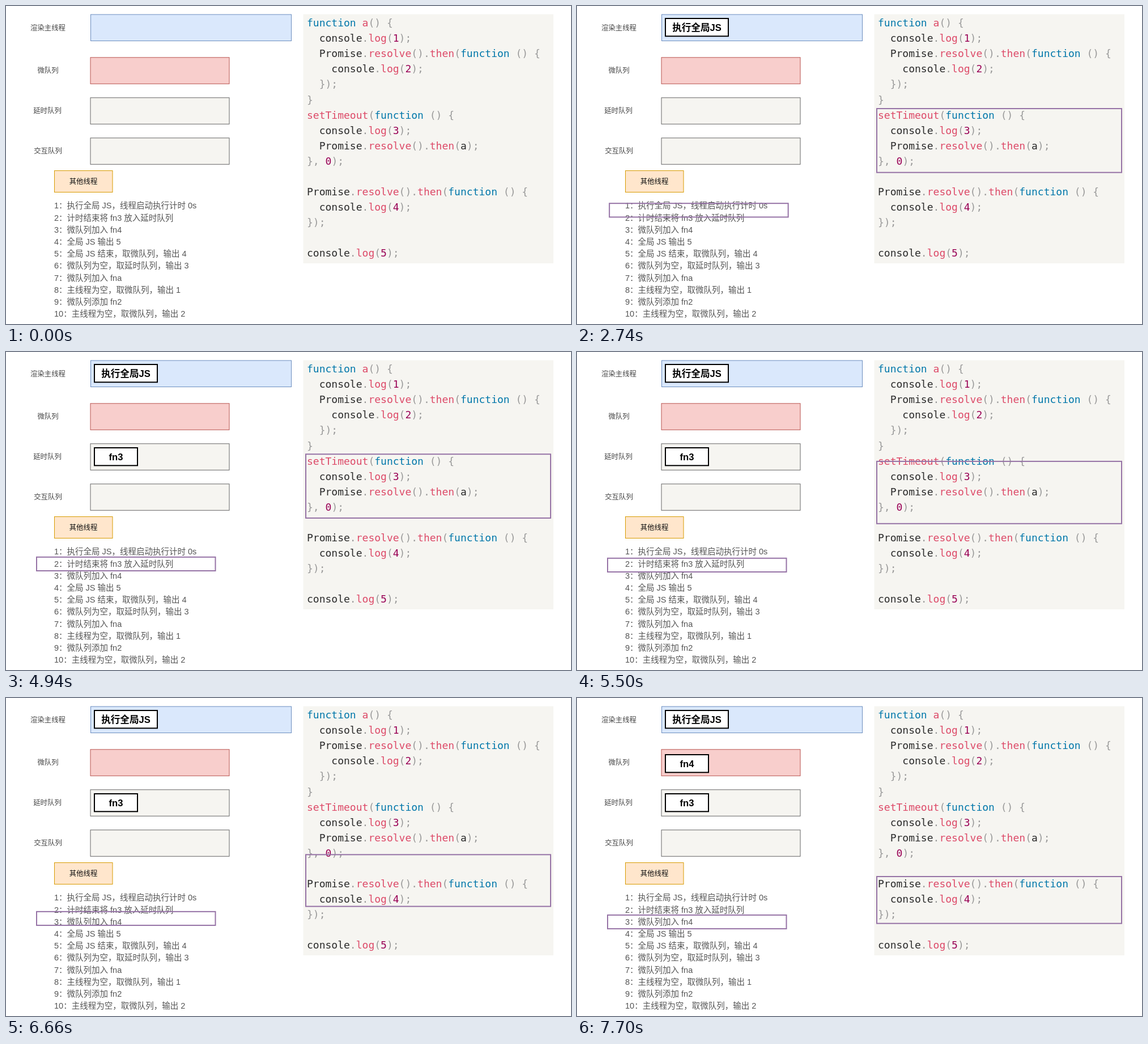
Recreate the animation shown at these times as an HTML page. Size 997 by 561 pixels, loop 8000 ms.

```html
<!DOCTYPE html>
<html lang="zh-CN">
<head>
<meta charset="utf-8">
<title>事件循环</title>
<style>
html, body { margin: 0; width: 100%; height: 100%; overflow: hidden; background: #fff; }
svg { display: block; width: 100%; height: 100%; font-family: "Liberation Sans", "Noto Sans CJK SC", "Noto Sans CJK", sans-serif; }
text { white-space: pre; }
.label { font-size: 12.4px; text-anchor: middle; fill: #444; }
.dark { fill: #111; }
.step { font-size: 14.5px; fill: #555; }
.task { font-size: 16.6px; font-weight: bold; text-anchor: middle; fill: #000; }
.code { font: 18px "DejaVu Sans Mono", monospace; fill: #2b2b2b; }
.keyword { fill: #0077aa; }
.call { fill: #dd4a68; }
.number { fill: #990055; }
.mark { fill: #999; }
</style>
</head>
<body>
<svg id="stage" viewBox="0 0 997 561"></svg>
<script>
const stage = document.getElementById('stage');

function add(parent, tag, attrs, content = '') {
  const node = document.createElementNS('http://www.w3.org/2000/svg', tag);
  for (const key in attrs) node.setAttribute(key, attrs[key]);
  node.textContent = content;
  return parent.appendChild(node);
}
const rect = (parent, x, y, width, height, fill, stroke = 'none', weight = 1) =>
  add(parent, 'rect', { x, y, width, height, fill, stroke, 'stroke-width': weight });
const text = (parent, x, y, className, content) =>
  add(parent, 'text', { x, y, class: className }, content);

function task(y, width, label) {
  const group = add(stage, 'g', {});
  rect(group, 156, y, width, 31.3, '#fff', '#000', 2);
  text(group, 156 + width / 2, y + 22, 'task', label);
  return group;
}
function thread(x, label) {
  const group = add(stage, 'g', {});
  rect(group, x, 290.5, 102.5, 38, '#ffe6cc', '#d79b00');
  text(group, x + 51, 314, 'label dark', label);
  return group;
}

const paper = '#f6f5f1';

// Queues
rect(stage, 149.5, 15, 354, 46.5, '#dae8fc', '#6c8ebf');
rect(stage, 149, 90.8, 245, 46.5, '#f8cecc', '#b85450');
rect(stage, 149, 161.8, 245, 46.5, paper, '#666');
rect(stage, 149, 232.8, 245, 46.5, paper, '#666');
['渲染主线程', '微队列', '延时队列', '交互队列'].forEach((name, i) =>
  text(stage, i ? 74 - (i === 2 ? 1 : 0) : 74, [42.5, 118, 189, 260][i], 'label', name));
thread(85.5, '其他线程');

// Steps
['执行全局 JS，线程启动执行计时 0s', '计时结束将 fn3 放入延时队列', '微队列加入 fn4',
 '全局 JS 输出 5', '全局 JS 结束，取微队列，输出 4', '微队列为空，取延时队列，输出 3',
 '微队列加入 fna', '主线程为空，取微队列，输出 1', '微队列添加 fn2', '主线程为空，取微队列，输出 2']
  .forEach((step, i) => text(stage, 85, 357.3 + i * 21.2, 'step', `${i + 1}：${step}`));

// Code panel
const source = `function a() {
  console.log(1);
  Promise.resolve().then(function () {
    console.log(2);
  });
}
setTimeout(function () {
  console.log(3);
  Promise.resolve().then(a);
}, 0);

Promise.resolve().then(function () {
  console.log(4);
});

console.log(5);`;

function tokenClass(token, rest) {
  if (token === 'function') return 'keyword';
  if (/^\d/.test(token)) return 'number';
  if (/^\w/.test(token)) return rest[0] === '(' ? 'call' : '';
  return 'mark';
}
rect(stage, 524.5, 14.5, 441.5, 439.5, paper);
source.split('\n').forEach((line, i) => {
  const row = text(stage, 531, 36.2 + i * 27.07, 'code', '');
  for (const match of line.matchAll(/\w+|\s+|[^\w\s]+/g)) {
    const rest = line.slice(match.index + match[0].length);
    add(row, 'tspan', { class: tokenClass(match[0], rest) }, match[0]);
  }
});

// Moving parts
const timer = thread(198.5, '计时 0s 执行 fn3');
const globalTask = task(22, 111, '执行全局JS');
const microTask = task(100, 76, 'fn4');
const delayTask = task(169, 76, 'fn3');
const stepFrame = rect(stage, 59, 340.3, 315.5, 24.2, 'none', '#9673a6', 2);
const codeFrame = rect(stage, 529, 181, 432, 112.7, 'none', '#9673a6', 2);

const LOOP = 8000, MOVE = 2800, FIRST_MOVE = 1560, SECOND_MOVE = 4900;
const ramp = (t, start, duration) => Math.min(1, Math.max(0, (t - start) / duration));
const mix = (a, b, p) => a + (b - a) * p;

// cubic-bezier(.42, 0, .58, 1)
function easeInOut(x) {
  let low = 0, high = 1;
  for (let i = 0; i < 24; i++) {
    const s = (low + high) / 2, r = 1 - s;
    if (1.26 * s * r * r + 1.74 * s * s * r + s * s * s < x) low = s; else high = s;
  }
  return low * low * (3 - 2 * low);
}
const opacity = (node, value) => node.setAttribute('opacity', value);

function draw(t) {
  const intro = ramp(t, 470, 550);
  const first = ramp(t, FIRST_MOVE, MOVE), second = ramp(t, SECOND_MOVE, MOVE);
  const p = easeInOut(first), q = easeInOut(second);

  for (const node of [globalTask, stepFrame, codeFrame]) opacity(node, intro);
  opacity(timer, intro * (1 - ramp(first, 0, 0.3)));
  opacity(delayTask, ramp(first, 0.695, 0.305));
  opacity(microTask, ramp(second, 0.695, 0.305));

  stepFrame.setAttribute('x', mix(59, 54, p));
  stepFrame.setAttribute('y', 340.3 + 21.5 * p + 21.1 * q);
  const top = second > 0 ? mix(180.2, 315, q) : 181;
  const bottom = second > 0 ? mix(292.9, 397.7, q) : 293.7;
  codeFrame.setAttribute('y', top);
  codeFrame.setAttribute('height', bottom - top);
}

const began = performance.now();
function tick() {
  draw((performance.now() - began) % LOOP);
  requestAnimationFrame(tick);
}
draw(0);
requestAnimationFrame(tick);
</script>
</body>
</html>
```
